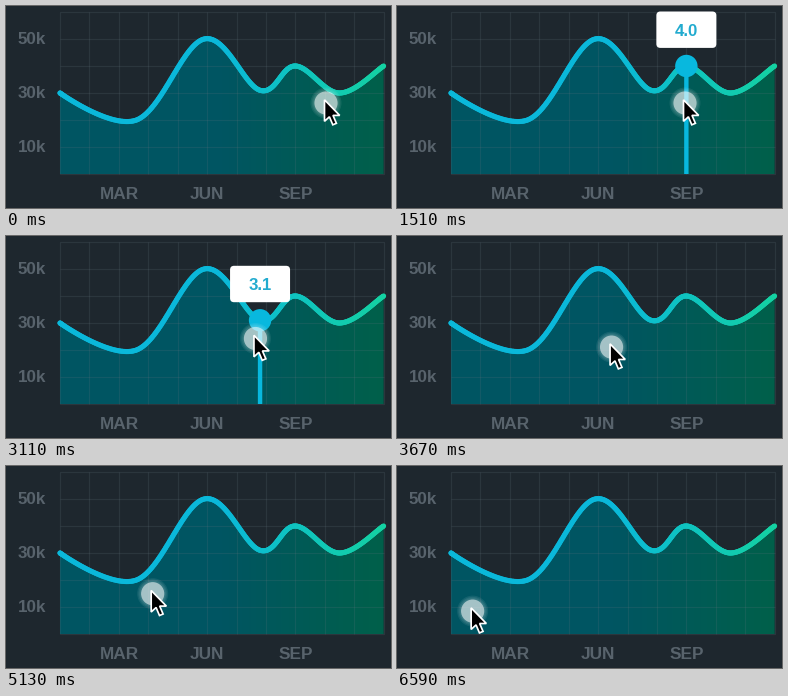
These frames come from a looping animation (385 by 202 pixels, 6660 ms). A matplotlib script:

```python
import numpy as np
import matplotlib.pyplot as plt
from matplotlib.animation import FuncAnimation
from matplotlib.collections import LineCollection
from matplotlib.patches import Circle, FancyBboxPatch, Polygon

W, H, DPI = 385, 202, 100
LOOP, STEP = 6660, 30
TICK, START = 69.4, 750
PX = 72 / DPI                    # points per pixel

BG, GRID, LABEL, CYAN = "#1e272e", "#64737d", "#58636c", "#08b8de"
LINE_ENDS = np.array([[10, 184, 218], [20, 209, 162]]) / 255
AREA_ENDS = np.array([[0, 85, 98], [0, 96, 74]]) / 255

LEFT, TOP, BOTTOM = 54, 6, 168
UX, UY = 29.42, 27
RIGHT = LEFT + 11 * UX
SPOTS = [(0, 3), (2.6, 2), (4.9, 5), (6.8, 3.1), (8, 4), (9.5, 3), (11, 4)]
PTS = np.array([(LEFT + x * UX, BOTTOM - y * UY) for x, y in SPOTS])
REACH = 10                       # horizontal touch distance


def pointer(t):
    """Glide left, rest at the fifth spot, then drift down to the left."""
    x = np.interp(t, (START, 1400, 2350, 4570, 5750, 6590),
                  (320, 288, 288, 164, 127, 75))
    return x, 97 + 0.245 * max(0, 272 - x)


def smooth_curve(pts, smoothness=0.35, n=50):
    """Chain of cubic Beziers through the points."""
    t = np.linspace(0, 1, n)[:, None]
    out, bend = [], np.zeros(2)
    for i in range(1, len(pts)):
        a, b = pts[i - 1], pts[i]
        c1 = a + bend
        bend = (pts[min(i + 1, len(pts) - 1)] - a) / 2 * smoothness
        c2 = b - bend
        out.append((1 - t)**3 * a + 3 * (1 - t)**2 * t * c1
                   + 3 * (1 - t) * t**2 * c2 + t**3 * b)
    return np.vstack(out)


def gradient(x, ends):
    """First colour up to the middle, then a blend to the second."""
    f = np.clip((x - LEFT) / (RIGHT - LEFT) * 2 - 1, 0, 1)[:, None]
    return ends[0] * (1 - f) + ends[1] * f


def label(x, y, s, size, color, **kw):
    return ax.text(x, y, s, fontsize=size * PX, color=color, weight="bold",
                   family="Liberation Sans", ha="center",
                   va="center_baseline", **kw)


def disc(r, **kw):
    return ax.add_patch(Circle((0, 0), r, lw=0, **kw))


fig = plt.figure(figsize=(W / DPI, H / DPI), dpi=DPI, facecolor=BG)
ax = fig.add_axes([0, 0, 1, 1])
ax.axis("off")

# filled area and line
curve = smooth_curve(PTS)
area = ax.imshow(gradient(np.arange(LEFT, RIGHT) + 0.5, AREA_ENDS)[None],
                 aspect="auto", extent=(LEFT, RIGHT, BOTTOM, TOP), zorder=1)
outline = np.vstack([curve, (RIGHT, BOTTOM), (LEFT, BOTTOM)])
area.set_clip_path(Polygon(outline, transform=ax.transData))
segs = np.stack([curve[:-1], curve[1:]], axis=1)
ax.add_collection(LineCollection(
    segs, colors=gradient(segs[:, :, 0].mean(axis=1), LINE_ENDS),
    linewidths=5.1 * PX, capstyle="round", zorder=3))

# grid and axis labels
grid = dict(colors=GRID, alpha=0.2, lw=1.2 * PX, zorder=2)
ax.vlines(LEFT + UX * np.arange(12), TOP, BOTTOM, **grid)
ax.hlines(BOTTOM - UY * np.arange(7), LEFT, RIGHT, **grid)
for k in (1, 3, 5):
    label(26, BOTTOM - k * UY - 0.6, f"{k}0k", 17, LABEL)
for k, month in zip((2, 5, 8), ("MAR", "JUN", "SEP")):
    label(LEFT + k * UX + 0.2, 187.3, month, 17.2, LABEL)

# touch indicator
stem, = ax.plot([], [], color=CYAN, lw=4.4 * PX, solid_capstyle="butt",
                snap=False, zorder=4)
dot = disc(11.2, fc=CYAN, zorder=5)
box = ax.add_patch(FancyBboxPatch(
    (0, 0), 60, 36.4, boxstyle="round,pad=0,rounding_size=4",
    fc="white", lw=0, zorder=6))
value = label(0, 0, "", 16.8, "#22abcf", zorder=7)
tip = (stem, dot, box, value)

# pointer: soft touch disc and arrow
halo = [disc(r, fc="white", alpha=0.08, zorder=8) for r in (15.5, 14.2, 13)]
halo.append(disc(11.6, fc="white", alpha=0.55, zorder=8))
ARROW = np.array([(0, 0), (0, 21.5), (4.9, 17), (8.3, 25), (11.9, 23.5),
                  (8.5, 15.6), (15.2, 15.6)]) + (-1.5, -3.2)
arrow = ax.add_patch(Polygon(ARROW, fc="black", ec="white", lw=1.7 * PX,
                             joinstyle="miter", zorder=9))

ax.set_xlim(0, W)
ax.set_ylim(H, 0)


def update(i):
    t = START + TICK * np.floor((i * STEP + STEP / 2 - START) / TICK)
    x, y = pointer(t)
    for c in halo:
        c.center = x, y
    arrow.set_xy(ARROW + (x, y))

    near = np.argmin(abs(PTS[:, 0] - x))
    px, py = PTS[near]
    shown = abs(px - x) <= REACH
    for a in tip:
        a.set_visible(shown)
    if shown:
        stem.set_data([px, px], [py, BOTTOM])
        dot.center = px, py
        box.set_x(px - 30)
        box.set_y(py - 54.5)
        value.set_position((px, py - 36.4))
        value.set_text(f"{SPOTS[near][1]:.1f}")
    return (*tip, *halo, arrow)


anim = FuncAnimation(fig, update, frames=LOOP // STEP, interval=STEP,
                     repeat=True, repeat_delay=0, blit=False)
plt.show()
```
